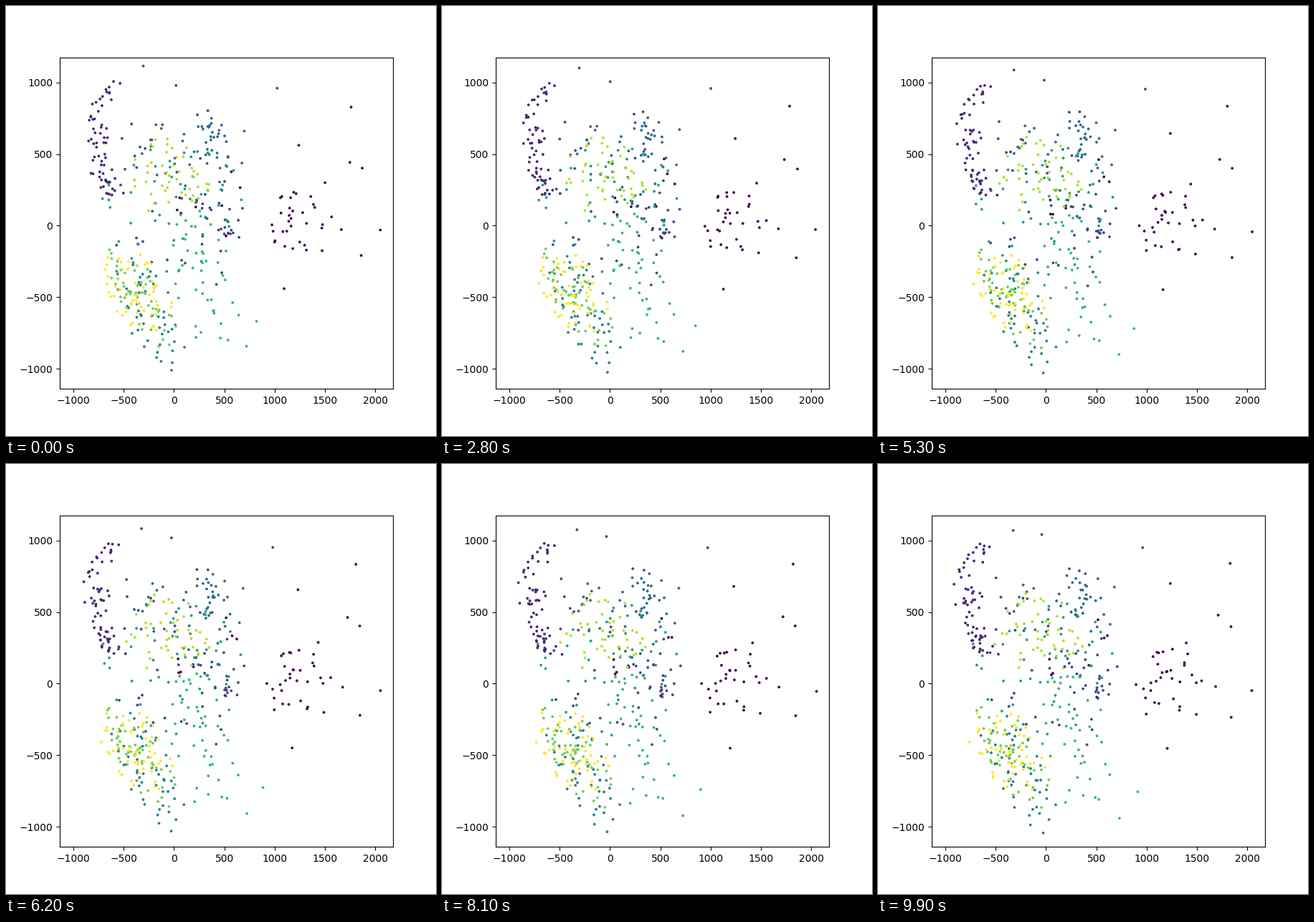
Animation, 600 px wide and 600 px high, one loop 10000 ms. Source, as a matplotlib script:

```python
import numpy as np
import matplotlib.pyplot as plt
from matplotlib.animation import FuncAnimation

FRAMES = 100
rng = np.random.default_rng(11)

# Outermost points: x, y, dx, dy, class
KEYS = [
    (1760, 828, 70, 12, 0), (1870, 402, -32, -4, 0), (2050, -30, -5, -18, 0),
    (1860, -208, -20, -27, 0), (1095, -440, 110, -12, 0),
    (1240, 562, -5, 138, 0), (-305, 1115, -20, -45, 2), (20, 980, -62, 62, 2),
    (1025, 960, -65, -10, 2), (820, -668, 92, -87, 6),
    (720, -842, 10, -98, 6), (-25, -1010, -3, -33, 4),
]

# Clouds: class, count, centre x and y, spread x and y, tilt
CLOUDS = [
    (0, 20, 1200, 30, 130, 120, 0), (0, 15, 1400, 180, 200, 220, 0.3),
    (0, 9, 330, 130, 240, 220, 0), (2, 24, 470, 10, 125, 110, 0),
    (2, 32, 0, 150, 330, 390, 0), (3, 24, 370, 610, 80, 75, 0),
    (3, 22, 260, 530, 310, 140, 0), (4, 50, -250, -600, 180, 150, -0.6),
    (5, 48, 0, 130, 360, 230, 0), (6, 44, 300, -380, 180, 260, -0.3),
    (7, 52, -300, -520, 190, 130, -0.8), (8, 46, -70, 350, 220, 160, 0),
    (9, 56, -370, -460, 180, 140, -0.3),
]


def drift(n):
    return rng.normal((-6, -4), (38, 30), (n, 2))


def cloud(n, cx, cy, sx, sy, tilt):
    r, a = 2 * rng.random(n) ** 0.6, rng.uniform(0, 2 * np.pi, n)
    dx, dy = sx * r * np.cos(a), sy * r * np.sin(a)
    return np.c_[cx + dx, cy + dy + tilt * dx]


def crescent(n):
    y = rng.uniform(200, 1010, n)
    x = -770 + 160 * ((y - 580) / 420) ** 2 + rng.normal(0, 60, n)
    return np.c_[x, y]


keys = np.array(KEYS, float)
groups = [(1, crescent(65))] + [(c, cloud(*shape)) for c, *shape in CLOUDS]
start = np.vstack([keys[:, :2]] + [pts for _, pts in groups])
move = np.vstack([keys[:, 2:4], drift(len(start) - len(keys))])
label = np.hstack([keys[:, 4]] + [np.full(len(pts), c) for c, pts in groups])
wobble = rng.normal(0, 5, start.shape)

fig, ax = plt.subplots(figsize=(6, 6), dpi=100)
dots = ax.scatter(*start.T, c=label, s=3, cmap="viridis", vmin=0, vmax=9)
ax.set_xlim(-1135, 2176)
ax.set_ylim(-1139, 1174)


def update(i):
    t = i / (FRAMES - 1)
    p = t * (1.25 - 0.25 * t)
    dots.set_offsets(start + p * move + np.sin(2 * np.pi * t) * wobble)
    return (dots,)


anim = FuncAnimation(fig, update, frames=FRAMES, interval=100,
                     repeat=True, repeat_delay=0)
plt.show()
```
